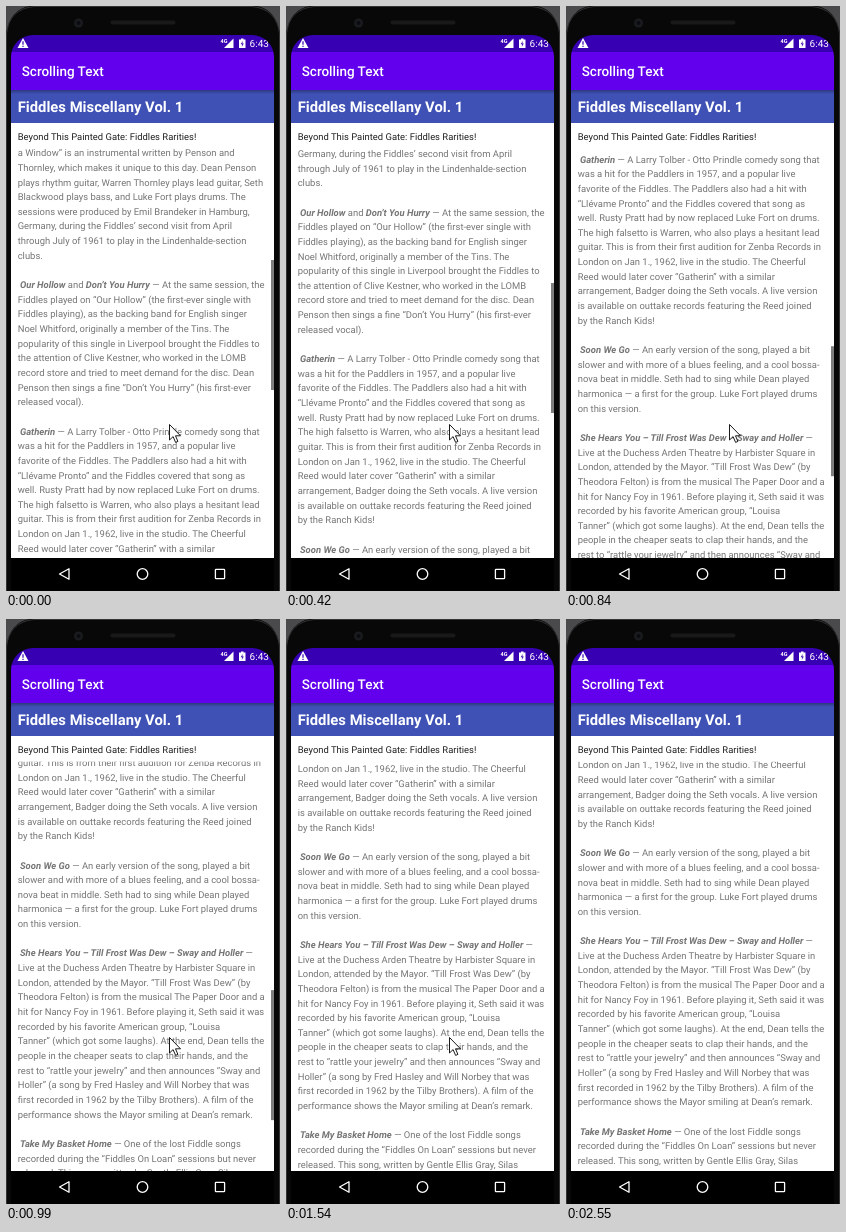
An HTML page that plays this animation: 274 px wide and 585 px high, repeating every 3150 ms.

```html
<!DOCTYPE html>
<html lang="en">
<head>
<meta charset="utf-8">
<title>Scrolling Text</title>
<style>
html, body { margin: 0; height: 100%; overflow: hidden; background: #080809; }
svg { display: block; width: 274px; height: 585px; }
text { font: 9.43px Roboto, sans-serif; text-rendering: geometricPrecision; white-space: pre; }
#lines text { fill: #757575; }
.b { font-weight: 700; font-style: italic; }
.w { fill: #fff; }
.nav { fill: none; stroke: #fff; stroke-width: 1.3; stroke-linejoin: round; }
</style>
</head>
<body>
<svg viewBox="0 0 274 585">
  <defs>
    <linearGradient id="shade" x2="0" y2="1">
      <stop stop-color="#000" stop-opacity=".3"/>
      <stop offset="1" stop-color="#000" stop-opacity="0"/>
    </linearGradient>
  </defs>

  <rect x="5" y="100" width="263" height="460" fill="#fff"/>
  <g id="lines"></g>
  <rect id="bar" x="265" width="3" height="130" fill="#7f7f7f"/>

  <!-- headers -->
  <rect x="5" y="29" width="263" height="17" fill="#3700b3"/>
  <rect x="5" y="117" width="263" height="25.7" fill="#fff"/>
  <rect x="5" y="84" width="263" height="33" fill="#3f51b5"/>
  <rect x="5" y="84" width="263" height="4" fill="url(#shade)"/>
  <rect x="5" y="46" width="263" height="38" fill="#6200ee"/>
  <text class="w" x="15.7" y="70" style="font-size:13.5px;font-weight:500">Scrolling Text</text>
  <text class="w" x="11.7" y="106.2" style="font-size:14.8px;font-weight:700">Fiddles Miscellany Vol. 1</text>
  <text x="11.7" y="134.2" fill="#212121">Beyond This Painted Gate: Fiddles Rarities!</text>

  <!-- status icons -->
  <path class="w" d="M17 32L22.5 42H11.5Z"/>
  <path d="M17 35.3V38.7M17 39.7V41" stroke="#3700b3" stroke-width="1.2"/>
  <text class="w" x="214.6" y="37" style="font-size:5.5px;font-weight:700">4G</text>
  <path class="w" d="M227.5 32.5V42H218Z"/>
  <path class="w" d="M233 33.5H235V32.5H237.5V33.5H239.5V42H233Z"/>
  <path d="M236.8 34.7L234.7 38.3H236.2L235.7 41L237.8 37.4H236.3Z" fill="#3700b3"/>
  <text class="w" x="243.6" y="41.4" style="font-size:10px">6:43</text>

  <!-- phone body around the screen -->
  <path d="M0 0H274V585H268V51A22 22 0 0 0 246 29H27A22 22 0 0 0 5 51V585H0Z" fill="#080809"/>
  <path d="M0 0H24Q4 3 0 28ZM274 0H250Q270 3 274 28Z" fill="#4a4a4c"/>
  <path d="M.5 585V28Q3 3 28 .5H246Q271 3 273.5 28V585" fill="none" stroke="#333335"/>
  <circle cx="72.5" cy="17" r="4.5" fill="#1a1b1e"/>
  <circle cx="72.5" cy="17" r="2" fill="#0b0c12"/>
  <rect x="104.5" y="14.5" width="65" height="4" rx="2" fill="#19191a"/>

  <!-- navigation -->
  <rect x="5" y="552" width="263" height="33" fill="#000"/>
  <path class="nav" d="M53.5 568L63 562.7V573.3Z"/>
  <circle class="nav" cx="136.5" cy="568" r="5.3"/>
  <rect class="nav" x="209.4" y="563.4" width="9.2" height="9.2" rx=".6"/>

  <path id="mouse" d="M.5 .5V16L4.1 12.6L6.6 18.4L8.9 17.4L6.5 11.8H11.5Z" fill="#fff" stroke="#000" stroke-width=".9"/>
</svg>
<script>
const story = `a Window” is an instrumental written by Penson and
Thornley, which makes it unique to this day. Dean Penson
plays rhythm guitar, Warren Thornley plays lead guitar, Seth
Blackwood plays bass, and Luke Fort plays drums. The
sessions were produced by Emil Brandeker in Hamburg,
Germany, during the Fiddles’ second visit from April
through July of 1961 to play in the Lindenhalde-section
clubs.

 *Our Hollow* and *Don’t You Hurry* — At the same session, the
Fiddles played on “Our Hollow” (the first-ever single with
Fiddles playing), as the backing band for English singer
Noel Whitford, originally a member of the Tins. The
popularity of this single in Liverpool brought the Fiddles to
the attention of Clive Kestner, who worked in the LOMB
record store and tried to meet demand for the disc. Dean
Penson then sings a fine “Don’t You Hurry” (his first-ever
released vocal).

 *Gatherin* — A Larry Tolber - Otto Prindle comedy song that
was a hit for the Paddlers in 1957, and a popular live
favorite of the Fiddles. The Paddlers also had a hit with
“Llévame Pronto” and the Fiddles covered that song as
well. Rusty Pratt had by now replaced Luke Fort on drums.
The high falsetto is Warren, who also plays a hesitant lead
guitar. This is from their first audition for Zenba Records in
London on Jan 1., 1962, live in the studio. The Cheerful
Reed would later cover “Gatherin” with a similar
arrangement, Badger doing the Seth vocals. A live version
is available on outtake records featuring the Reed joined
by the Ranch Kids!

 *Soon We Go* — An early version of the song, played a bit
slower and with more of a blues feeling, and a cool bossa-
nova beat in middle. Seth had to sing while Dean played
harmonica — a first for the group. Luke Fort played drums
on this version.

 *She Hears You – Till Frost Was Dew – Sway and Holler* —
Live at the Duchess Arden Theatre by Harbister Square in
London, attended by the Mayor. “Till Frost Was Dew” (by
Theodora Felton) is from the musical The Paper Door and a
hit for Nancy Foy in 1961. Before playing it, Seth said it was
recorded by his favorite American group, “Louisa
Tanner” (which got some laughs). At the end, Dean tells the
people in the cheaper seats to clap their hands, and the
rest to “rattle your jewelry” and then announces “Sway and
Holler” (a song by Fred Hasley and Will Norbey that was
first recorded in 1962 by the Tilby Brothers). A film of the
performance shows the Mayor smiling at Dean’s remark.

 *Take My Basket Home* — One of the lost Fiddle songs
recorded during the “Fiddles On Loan” sessions but never
released. This song, written by Gentle Ellis Gray, Silas`;

const LOOP = 3150, PITCH = 14.65;
// time, scroll, scrollbar opacity, pointer x, pointer y
const steps = [
  [0, 0, 1, 163, 418],
  [150, 57, 1, 163, 418],
  [420, 72.5, 1, 163, 418],
  [540, 118, 1, 163, 418],
  [690, 123.5, 1, 163, 418],
  [840, 272, 1, 163, 418],
  [990, 369.5, 1, 163, 418],
  [1140, 378, 1, 163, 418],
  [1400, 378, .5, 163, 418],
  [1540, 378, 0, 163, 418],
  [1980, 381.7, 1, 237, 536],
  [2130, 381.7, 1, 249, 566],
  [2280, 381.7, 1, 253, 577],
  [2430, 381.7, .5, 253, 600],
  [2550, 381.7, 0, 253, 600]
];

const [lines, bar, mouse] = ['lines', 'bar', 'mouse'].map(id => document.getElementById(id));

lines.innerHTML = story.split('\n').map((line, i) => {
  const x = line[0] === ' ' ? 14 : 11.7;
  const body = line.trim().replace(/\*(.+?)\*/g, '<tspan class="b">$1</tspan>');
  return `<text x="${x}" y="${150.2 + i * PITCH}">${body}</text>`;
}).join('');

function draw(now) {
  const t = now % LOOP;
  const [, scroll, alpha, x, y] = steps.findLast(s => s[0] <= t);
  lines.setAttribute('transform', `translate(0 ${-scroll})`);
  bar.setAttribute('y', 254 + scroll * .317);
  bar.setAttribute('opacity', alpha);
  mouse.setAttribute('transform', `translate(${x} ${y})`);
  requestAnimationFrame(draw);
}
draw(0);
</script>
</body>
</html>
```
